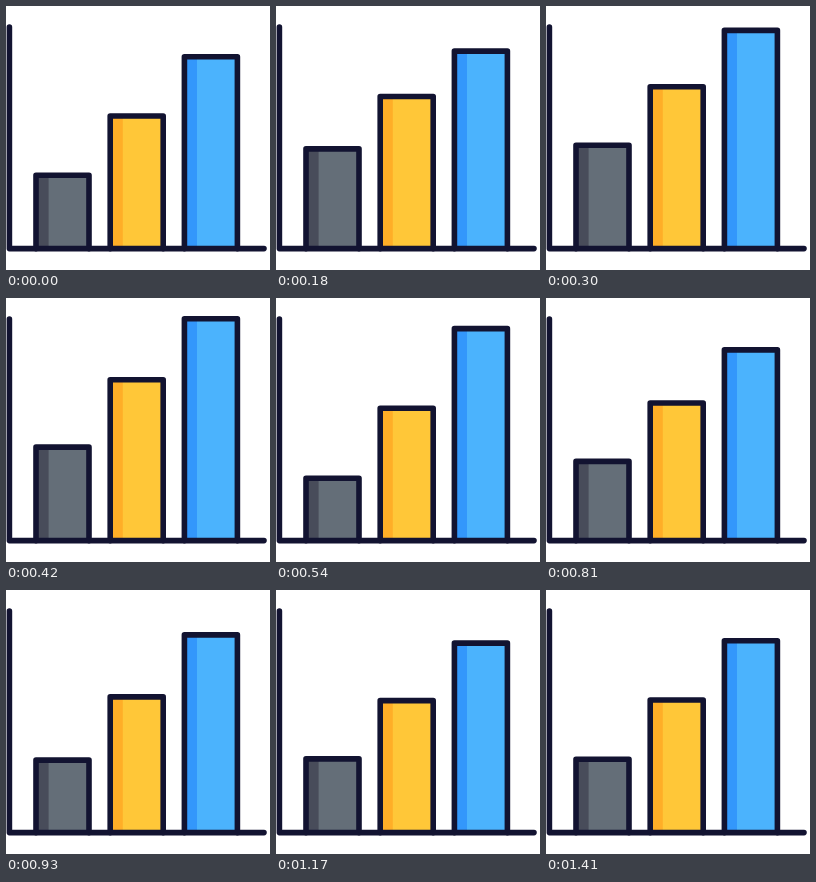
Write an HTML page that moves like this. It is 264x264 px and loops after 3440 ms.

```html
<!DOCTYPE html>
<html lang="en">
<head>
<meta charset="utf-8">
<title>Bar chart</title>
<style>
  html, body { margin: 0; width: 100%; height: 100%; overflow: hidden; background: #fff; }
  svg { display: block; width: 100%; height: 100%; }
  .line { fill: none; stroke: #121331; stroke-width: 5.6; stroke-linecap: round; stroke-linejoin: round; }
</style>
</head>
<body>
<svg viewBox="0 0 264 264">
  <g id="bars"></g>
  <path class="line" d="M3.4 21V242.6H258"/>
</svg>
<script>
const LOOP = 3440, STEP = 30, END = 1410, BASE = 242.6;
const bars = [
  { x: 30, top: 169.3, delay: 0, fill: '#646e78', shade: '#484c5a' },
  { x: 104.2, top: 110, delay: 60, fill: '#ffc738', shade: '#ffae27' },
  { x: 178.4, top: 50.8, delay: 120, fill: '#4bb3fd', shade: '#3397fb' }
];
const WIDTH = 53, SHADE = 12.6;

// Cubic bezier easing from (0,0) to (1,1) with control points (x1,0) and (x2,1)
const bezier = (x1, x2) => u => {
  let lo = 0, hi = 1, s = 0.5;
  for (let i = 0; i < 24; i++) {
    s = (lo + hi) / 2;
    const x = 3 * (1 - s) ** 2 * s * x1 + 3 * (1 - s) * s * s * x2 + s ** 3;
    if (x < u) lo = s; else hi = s;
  }
  return s * s * (3 - 2 * s);
};
const swing = u => (1 - Math.cos(Math.PI * u)) / 2;

// Height gained: time, value, easing towards it
const keys = [
  [0, 0],
  [300, 30, bezier(0.333, 0.2)],
  [570, -11.7, bezier(0.7, 0.5)],
  [785, 6.2, swing],
  [1000, -3, swing],
  [1180, 0.5, swing],
  [1290, 0, swing]
];

function lift(t) {
  if (t <= 0) return 0;
  const i = keys.findIndex(k => t < k[0]);
  if (i < 0) return 0;
  const [t0, v0] = keys[i - 1], [t1, v1, ease] = keys[i];
  return v0 + (v1 - v0) * ease((t - t0) / (t1 - t0));
}

const group = document.getElementById('bars');
function addPath(attrs) {
  const path = document.createElementNS('http://www.w3.org/2000/svg', 'path');
  for (const name in attrs) path.setAttribute(name, attrs[name]);
  return group.appendChild(path);
}
for (const bar of bars) {
  bar.parts = [
    [addPath({ fill: bar.fill }), WIDTH],
    [addPath({ fill: bar.shade }), SHADE],
    [addPath({ class: 'line' }), WIDTH]
  ];
}

function draw(time) {
  const t = Math.min(END, Math.floor(time % LOOP / STEP) * STEP);
  for (const bar of bars) {
    const top = bar.top - lift(t - bar.delay);
    for (const [path, w] of bar.parts) {
      path.setAttribute('d', `M${bar.x} ${BASE}V${top}H${bar.x + w}V${BASE}`);
    }
  }
}

let start;
function tick(now) {
  start ??= now;
  draw(now - start);
  requestAnimationFrame(tick);
}
draw(0);
requestAnimationFrame(tick);
</script>
</body>
</html>
```
